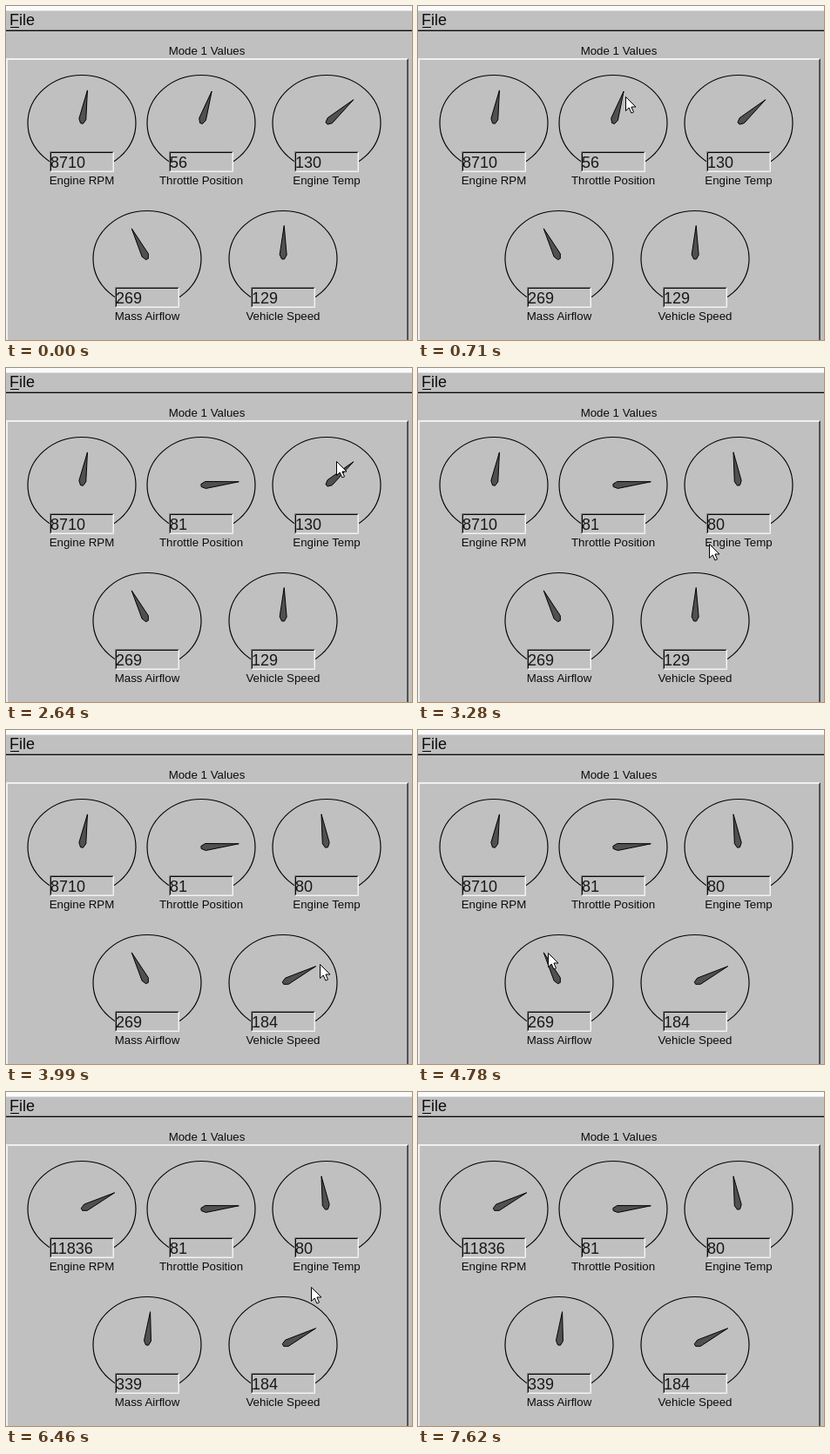
An HTML page that plays this animation: 466 px wide and 384 px high, repeating every 7700 ms.

```html
<!DOCTYPE html>
<html lang="en">
<head>
<meta charset="utf-8">
<title>Mode 1 Values</title>
<style>
  html, body { margin: 0; width: 100%; height: 100%; overflow: hidden; background: #c0c0c0; }
  svg { display: block; width: 466px; height: 384px; }
  text { font-family: "Liberation Sans", Arial, sans-serif; font-size: 13.3px; fill: #0c0c0c; }
  .mid { text-anchor: middle; }
  .menu { font-size: 18px; }
  .value { font-size: 18px; fill: #181818; }
  .dial { fill: none; stroke: #000; stroke-width: 1.15; }
  .needle { fill: #505050; stroke: #000; stroke-linejoin: round; }
  .edge { fill: none; }
</style>
</head>
<body>
<svg viewBox="0 0 466 384">
  <rect width="466" height="384" fill="#c0c0c0"/>
  <rect width="466" height="5" fill="#fbfbfb"/>
  <rect y="5" width="466" height="1" fill="#dcdcdc"/>
  <rect y="27" width="466" height="1" fill="#808080"/>
  <rect y="28" width="466" height="1" fill="#080808"/>
  <text class="menu" x="4" y="22">File</text>
  <rect x="5" y="24" width="10" height="1" fill="#000"/>
  <text class="mid" x="230.5" y="56">Mode 1 Values</text>
  <path d="M0 384V60H462V62H2V384Z" fill="#f0f0f0"/>
  <path d="M460 62L462 60V384H460Z" fill="#505050"/>
  <g id="gauges"></g>
  <path id="cursor" d="M.5 .5V16.5L4.2 13L6.9 19L9.5 17.9L6.9 12H12Z" fill="#fff" stroke="#000"/>
</svg>
<script>
const LOOP = 7700, SHOW = 170, HIDE = 7620;
const STEP = 80, PHASE = 60;   // the screen refreshes on this beat
const LEAD = 160;              // the needle trails the pointer by this much
const ENTER = { x: 300, y: 205 }, REST = { x: 350, y: 224 };
const NS = "http://www.w3.org/2000/svg";

// A dial spans lo..hi over 270 degrees; it is dragged from a to b between start and end,
// with the pointer held at a share (reach) of the needle's length. In order of use.
const gauges = [
  { name: "Throttle Position", x: 224, y: 135, lo: 0, hi: 100, a: 56, b: 81, start: 950, end: 1580, reach: 0.94 },
  { name: "Engine Temp", x: 368, y: 135, lo: -40, hi: 215, a: 130, b: 80, start: 2700, end: 2860, reach: 0.77 },
  { name: "Vehicle Speed", x: 318, y: 291, lo: 0, hi: 255, a: 129, b: 184, start: 3760, end: 3980, reach: 1.12 },
  { name: "Mass Airflow", x: 162, y: 291, lo: 0, hi: 655, a: 269, b: 339, start: 5030, end: 5180, reach: 1 },
  { name: "Engine RPM", x: 87, y: 135, lo: 0, hi: 16384, a: 8710, b: 11836, start: 5980, end: 6220, reach: 0.8 }
];

const clamp = v => Math.min(1, Math.max(0, v));
const mix = (a, b, k) => a + (b - a) * k;
const easeOut = k => 1 - Math.pow(1 - k, 1.7);

function add(parent, tag, attrs, text) {
  const el = document.createElementNS(NS, tag);
  for (const k in attrs) el.setAttribute(k, attrs[k]);
  if (text) el.textContent = text;
  return parent.appendChild(el);
}

// Sunken box: two nested one-pixel bevels
function sunken(root, x, y, w, h) {
  add(root, "rect", { x, y, width: w, height: h, fill: "#c0c0c0" });
  [["#808080", "#f4f4f4"], ["#080808", "#d8d8d8"]].forEach(([dark, light], i) => {
    const l = x + i + 0.5, t = y + i + 0.5, r = x + w - i - 0.5, b = y + h - i - 0.5;
    add(root, "path", { class: "edge", d: `M${l} ${b}H${r}V${t}`, stroke: light });
    add(root, "path", { class: "edge", d: `M${l} ${b}V${t}H${r}`, stroke: dark });
  });
}

function build(g) {
  const root = document.getElementById("gauges");
  add(root, "ellipse", { class: "dial", cx: g.x, cy: g.y - 0.5, rx: 62, ry: 55 });
  sunken(root, g.x - 37, g.y + 32, 74, 24);
  add(root, "text", { class: "mid", x: g.x, y: g.y + 70 }, g.name);
  g.text = add(root, "text", { class: "value", x: g.x - 36, y: g.y + 51 });
  g.needle = add(root, "polygon", { class: "needle" });
}

const reading = (g, t) => mix(g.a, g.b, clamp((t - g.start) / (g.end - g.start)));

function tip(g, t, reach = 1) {
  const turn = ((reading(g, t) - g.lo) / (g.hi - g.lo) - 0.5) * 1.5 * Math.PI;
  return { x: g.x + 43.5 * reach * Math.sin(turn), y: g.y - 38.5 * reach * Math.cos(turn) };
}

function needlePoints(g, t) {
  const p = tip(g, t), len = Math.hypot(p.x - g.x, p.y - g.y);
  const ux = (p.x - g.x) / len, uy = (p.y - g.y) / len;
  const point = (along, side) =>
    (g.x + ux * along - uy * side).toFixed(2) + "," + (g.y + uy * along + ux * side).toFixed(2);
  return [point(0, -1.5), point(5, -4), point(len, 0), point(5, 4), point(0, 1.5)].join(" ");
}

const hold = (g, t) => tip(g, t + LEAD, g.reach);

function travel(from, to, t, t0, t1) {
  const k = easeOut(clamp((t - t0) / (t1 - t0)));
  return { x: mix(from.x, to.x, k), y: mix(from.y, to.y, k) };
}

// The pointer travels to each dial in turn, drags its needle, then comes to rest
function pointer(t) {
  let from = ENTER, left = SHOW;
  for (const g of gauges) {
    const grab = g.start - LEAD;
    if (t < grab) return travel(from, hold(g, grab), t, left, grab);
    if (t <= g.end + STEP) return hold(g, t);
    from = hold(g, g.end);
    left = g.end + STEP;
  }
  return travel(from, REST, t, left, left + 2 * STEP);
}

const cursor = document.getElementById("cursor");

function draw(time) {
  const t = Math.floor((time - PHASE) / STEP) * STEP + PHASE;
  for (const g of gauges) {
    g.text.textContent = Math.round(reading(g, t));
    g.needle.setAttribute("points", needlePoints(g, t));
  }
  const p = pointer(t);
  cursor.setAttribute("transform", `translate(${Math.round(p.x)} ${Math.round(p.y)})`);
  cursor.setAttribute("visibility", time >= SHOW && time < HIDE ? "visible" : "hidden");
}

gauges.forEach(build);
const begun = performance.now();
function tick() {
  draw((performance.now() - begun) % LOOP);
  requestAnimationFrame(tick);
}
tick();
</script>
</body>
</html>
```
